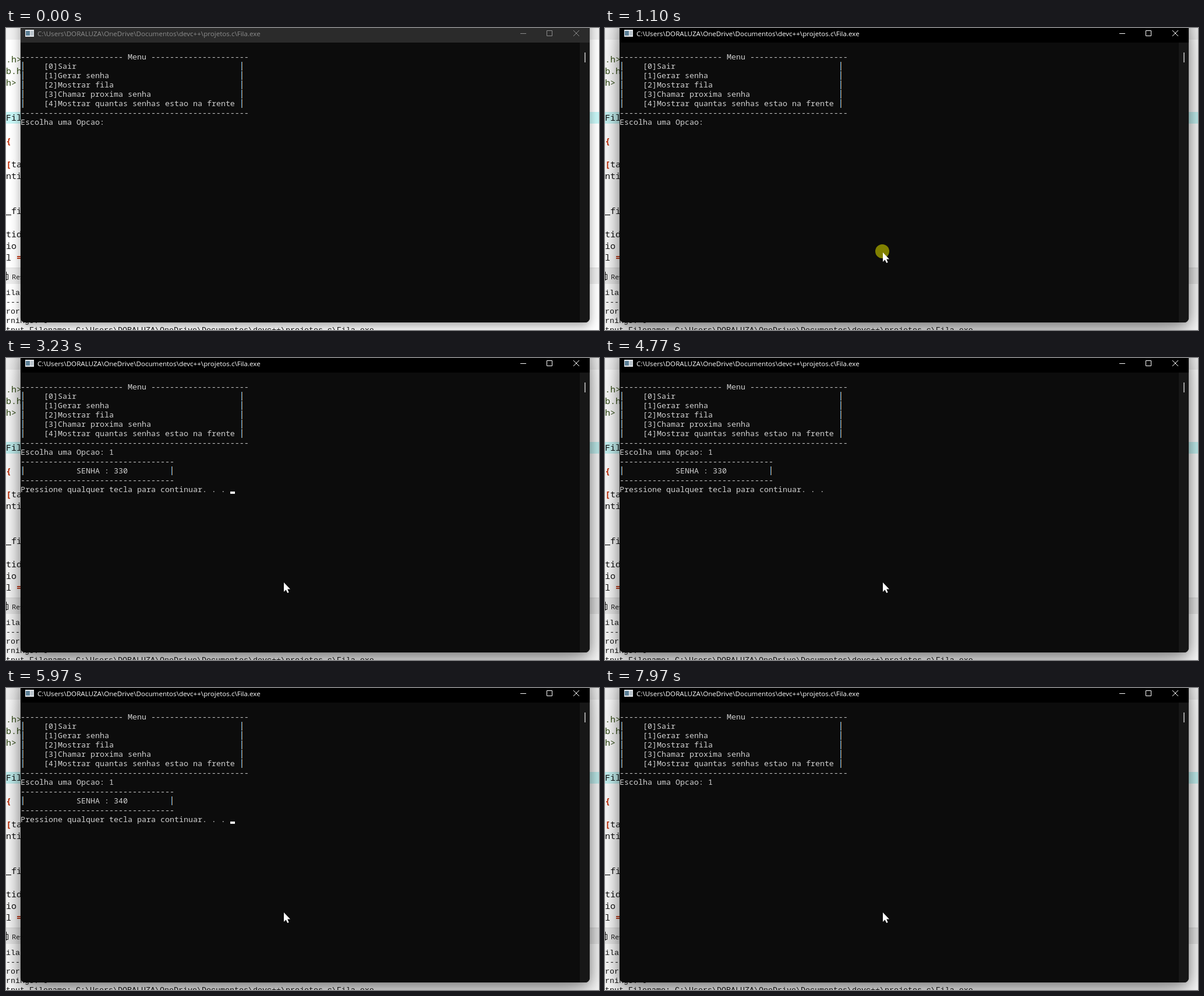
An HTML page that plays this animation: 1018x518 px, repeating every 8 s.

```html
<!DOCTYPE html>
<html lang="pt">
<head>
<meta charset="utf-8">
<title>Fila</title>
<style>
  html, body { margin: 0; width: 100%; height: 100%; overflow: hidden; background: #fff; }
  #stage { position: relative; width: 1018px; height: 518px; overflow: hidden; }
  svg { position: absolute; left: 0; top: 0; display: block; }
  text { white-space: pre; }
  .code { font: 15px "Noto Sans Mono", monospace; fill: #111; }
  .log { font: 13.3333px "Liberation Mono", monospace; fill: #111; }
  .ui { font: 11.6px "Open Sans", sans-serif; }
  .con { font: 13.3333px "Noto Sans Mono", monospace; fill: #d0d0d0; }
  #win {
    position: absolute; left: 25px; top: -20px; width: 977px; height: 525px;
    border-radius: 8px; overflow: hidden; background: #0c0c0c;
    box-shadow: 0 0 1px #333, 0 6px 18px rgba(0,0,0,.36);
  }
  #win::before { content: ""; position: absolute; inset: 0 0 auto; height: 45px; background: #2b2b2b; }
  #win::after { content: ""; position: absolute; right: 0; top: 45px; bottom: 0; width: 17px; background: #171717; }
  .active #win { box-shadow: 0 0 1px #222, 0 2px 21px rgba(0,0,0,.36), 0 24px 48px rgba(0,0,0,.32); }
  .active #win::before { background: #000; }
  #bar { color: #8c8c8c; }
  .active #bar { color: #fff; }
</style>
</head>
<body>
<div id="stage">
  <svg id="back" width="1018" height="518">
    <rect width="1018" height="518" fill="#fff"/>
    <rect width="1018" height="20" fill="#f0f0f0"/>
    <rect y="144" width="1018" height="20" fill="#c8f7f7"/>
    <rect y="411" width="1018" height="28" fill="#ececec"/>
    <path d="M0 411.5H1018" stroke="#dcdcdc"/>
    <path d="M.5 418V433M0 422.5H3.5V431.5H0" fill="none" stroke="#111"/>
  </svg>
  <div id="win"></div>
  <svg id="front" width="1018" height="518">
    <g id="bar">
      <rect x="33" y="3" width="15" height="12" fill="#e6e9ec"/>
      <rect x="34" y="5" width="7" height="8" fill="#5b7f96"/>
      <rect x="42" y="5" width="5" height="8" fill="#b9c3ca"/>
      <path d="M883 9.5H893M928.5 4.5H937.5V13.5H928.5ZM974 4L984 14M984 4L974 14" fill="none" stroke="currentColor"/>
    </g>
    <rect x="993" y="42" width="2" height="17" fill="#9f9f9f"/>
    <g id="menu"></g>
    <g id="digit"></g>
    <g id="ticket"></g>
    <rect id="caret" width="8" height="4" fill="#f2f2f2"/>
    <circle id="click" cx="476" cy="383" r="12" fill="#808000"/>
    <path id="mouse" d="M0 0V16L3.6 12.6 6.2 18 8.6 17 6.2 11.5H11Z" fill="#fff"/>
  </svg>
</div>
<script>
const LOOP = 8000;
const PATH = "C:\\Users\\DORALUZA\\OneDrive\\Documentos\\devc++\\projetos.c\\Fila.exe";
const $ = id => document.getElementById(id);

function add(parent, tag, attrs) {
  const el = document.createElementNS("http://www.w3.org/2000/svg", tag);
  for (const key in attrs) el.setAttribute(key, attrs[key]);
  $(parent).append(el);
  return el;
}

function put(parent, x, y, str, cls, color) {
  const el = add(parent, "text", { x, y, class: cls });
  if (color) el.style.fill = color;
  el.textContent = str;
  return el;
}

// Console cells are 8 by 16 pixels.
const cellX = col => 25 + col * 8;
const cellY = row => 25 + row * 16;
const print = (parent, col, row, str) => put(parent, cellX(col), cellY(row) + 13, str, "con");

// A bar with the colour fringes of subpixel rendering
function pipe(parent, col, row) {
  ["#4a9fe0", "#a8743a"].forEach((fill, i) =>
    add(parent, "rect", { x: cellX(col) + 3 + i, y: cellY(row) + 1, width: 1, height: 15, fill }));
}

function boxed(parent, row, right, col, str) {
  pipe(parent, 0, row);
  pipe(parent, right, row);
  return print(parent, col, row, str);
}

// Editor behind the window
[[".h>", 59], ["b.h", 79], ["h>", 99]].forEach(([s, y]) => put("back", 0, y, s, "code", "#2f4a12"));
[["Fil", 159], [" ta", 239], ["nti", 259], ["_fi", 319], ["tid", 359], ["io", 379], ["l", 399]]
  .forEach(([s, y]) => put("back", 0, y, s, "code"));
[["{", 0, 199], ["[", 0, 239], ["=", 18, 399]]
  .forEach(([s, x, y]) => put("back", x, y, s, "code", "#c02800").style.fontWeight = 600);
put("back", 10, 431, "Resources", "ui", "#111");
["ilation results...", "--------", "rors: 0", "rnings: 0", "tput Filename: " + PATH]
  .forEach((s, i) => put("back", 0, 458 + i * 16, s, "log"));

// Console
put("bar", 54, 14, PATH, "ui", "currentColor");
print("menu", 0, 1, "-".repeat(22) + " Menu " + "-".repeat(21));
["Sair", "Gerar senha", "Mostrar fila", "Chamar proxima senha", "Mostrar quantas senhas estao na frente"]
  .forEach((s, i) => boxed("menu", 2 + i, 47, 5, `[${i}]${s}`));
print("menu", 0, 7, "-".repeat(49));
print("menu", 0, 8, "Escolha uma Opcao:");
print("digit", 19, 8, "1");
print("ticket", 0, 9, "-".repeat(33));
const number = boxed("ticket", 10, 32, 12, "SENHA : 330");
print("ticket", 0, 11, "-".repeat(33));
print("ticket", 0, 12, "Pressione qualquer tecla para continuar. . .");

// Carets as [column, row]
const ASK = [19, 8], TYPED = [20, 8], ENTER = [0, 9], WAIT = [45, 12], NEXT = [0, 13];

// time, level (0 blank, 1 menu, 2 digit, 3 ticket), caret
const steps = [
  [0, 1], [1590, 2, TYPED], [1650, 2], [2110, 2, TYPED], [2710, 2],
  [2900, 2, ENTER], [2960, 3, WAIT], [3710, 3], [4240, 3, WAIT], [4770, 3],
  [5170, 0, NEXT], [5230, 1, ASK], [5700, 2, TYPED], [5830, 2], [5970, 3, WAIT],
  [6500, 1, ASK], [6760, 2, TYPED], [6890, 2], [7100, 2, ENTER], [7160, 3, WAIT],
  [7560, 3, NEXT], [7630, 1, ASK], [7830, 2, TYPED], [7970, 2]
];
const tickets = [[0, 330], [5900, 340], [7100, 343]];
const moves = [[0], [500, 812, 452], [570, 684, 427], [630, 578, 405], [700, 504, 390], [770, 477, 385]];

const at = (table, t) => table.findLast(row => row[0] <= t);
const show = (id, on) => $(id).style.display = on ? "" : "none";

function draw(t) {
  const [, level, caret] = at(steps, t);
  show("menu", level > 0);
  show("digit", level > 1);
  show("ticket", level > 2);
  show("caret", caret);
  if (caret) {
    $("caret").setAttribute("x", cellX(caret[0]));
    $("caret").setAttribute("y", cellY(caret[1]) + 12);
  }
  number.textContent = "SENHA : " + at(tickets, t)[1];

  const [, x, y] = at(moves, t);
  show("mouse", x);
  if (x) $("mouse").setAttribute("transform", `translate(${x} ${y})`);
  show("click", t >= 1100 && t < 1310);
  $("stage").classList.toggle("active", t >= 1100);
}

const start = performance.now();
function tick() {
  draw((performance.now() - start) % LOOP);
  requestAnimationFrame(tick);
}
tick();
</script>
</body>
</html>
```
